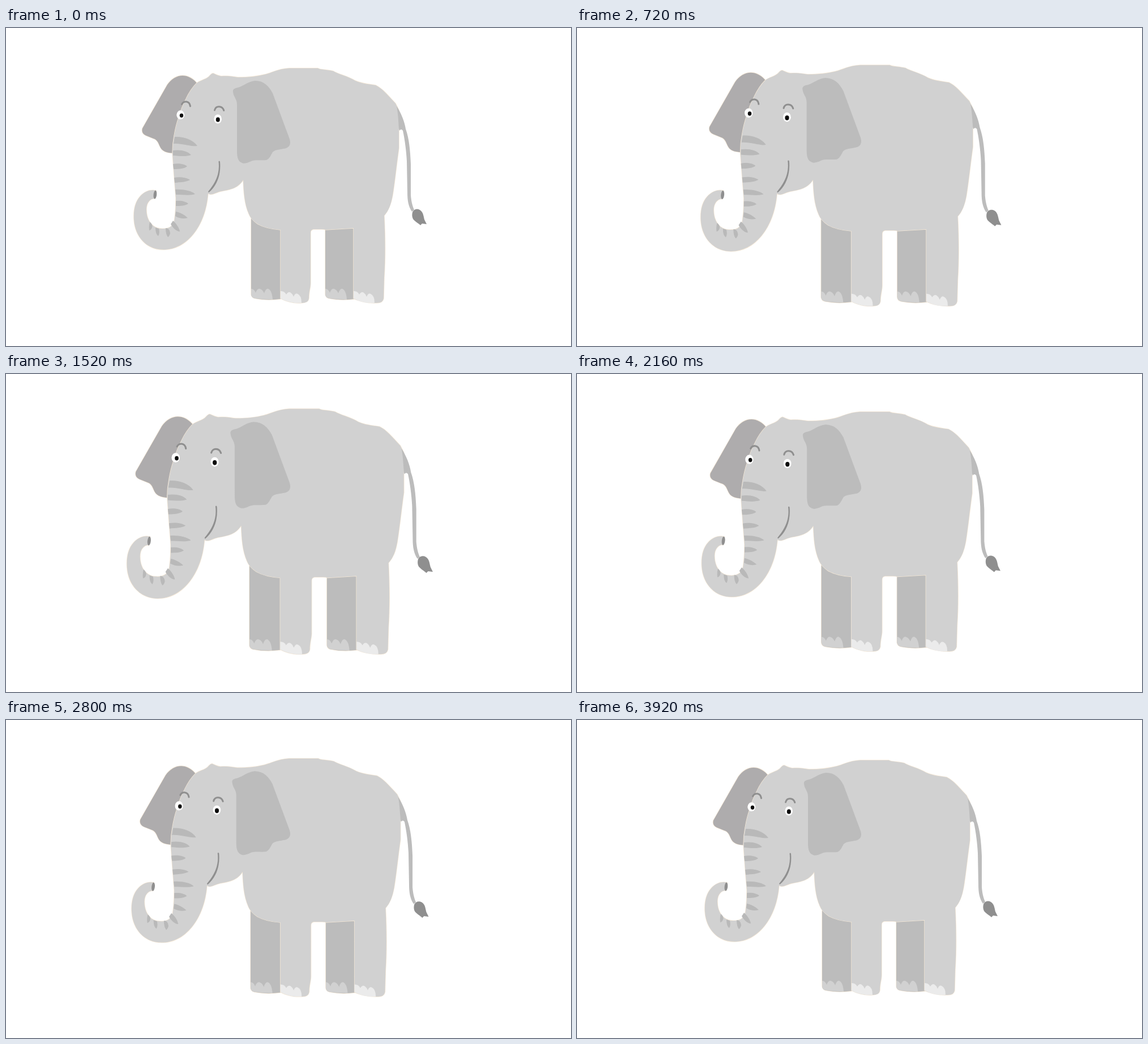
Recreate the animation shown at these times as an HTML page. Size 998x561 px, loop 3960 ms.

```html
<!DOCTYPE html>
<html lang="en">
<head>
<meta charset="utf-8">
<title>Elephant</title>
<style>
  html, body { margin: 0; width: 100%; height: 100%; overflow: hidden; background: #fff; }
  svg { display: block; width: 100vw; height: 100vh; }
  .skin { fill: #d1d1d1; }
  .shade { fill: #bcbcbc; }
  .dark { fill: #8f8f8f; }
  .nail { fill: #ebebeb; }
  .line { fill: none; stroke: #8f8f8f; stroke-width: 3; stroke-linecap: round; }
  .rim { stroke: #f5e8d6; stroke-width: 1.4; paint-order: stroke; }
</style>
</head>
<body>
<svg viewBox="0 0 998 561">
  <defs>
    <path id="farLeg" d="M433 336V470Q434 476 440 477C455 480 470 480 485 478V336Z"/>
    <path id="farToes" d="M433 460Q438 460 441 467Q444 459 448 460Q453 461 456 468Q459 459 463 460Q470 463 471 479Q455 479 440 477Q434 476 433 470Z"/>
    <path id="nearToes" d="M485 464Q492 464 495 470Q499 464 503 467Q506 469 508 474Q511 467 515 469Q522 472 522 485C508 486 495 483 485 477Z"/>
  </defs>
  <g id="elephant">
    <path class="rim" fill="#aeacad" d="M340 101C331 88 320 84 312 84C302 84 292 90 285 100L241 177C239 184 243 188 248 190L263 196C270 200 270 208 275 214C280 219 286 220 296 221L320 170Z"/>

    <g class="shade rim">
      <use href="#farLeg"/>
      <use href="#farLeg" x="131"/>
    </g>
    <g class="skin">
      <use href="#farToes"/>
      <use href="#farToes" x="131"/>
    </g>

    <path class="skin rim" d="M337 97C344 92 352 91 358 86C361 83 363 80 366 80C371 82 374 84 380 85C395 84 400 86 410 87C430 87 445 85 457 82C470 79 480 72 500 71L551 71C556 74 566 73 578 76C588 82 602 84 617 93C628 98 640 99 653 101C665 107 672 116 688 133L694 145L694 212C690 240 687 270 683 295C680 312 676 322 668 331C670 370 670 410 668 440L667 477C666 482 663 485 655 485C640 486 622 482 614 477V353L564 356Q563 355 558 355H543Q538 356 538 361V450C538 458 535 465 535 477C534 483 530 485 522 485C510 486 495 483 485 477V356C470 355 456 352 445 346C438 341 432 336 429 328C421 310 420 290 419 268C410 282 398 285 380 288C368 291 364 296 357 292C352 352 318 391 278 391C248 391 228 368 226 338C225 322 228 307 237 297C244 289 255 284 265 287L263 301C256 300 248 307 248 320C248 338 257 353 274 354C288 355 297 350 298 335C300 320 300 310 300 300L297 262L294 221Q294 205 297 190Q300 172 305 158Q310 140 318 125Q326 108 337 97Z"/>
    <g class="nail">
      <use href="#nearToes"/>
      <use href="#nearToes" x="129"/>
    </g>

    <path class="shade" d="M690 138C698 150 704 165 706 178C712 195 714 215 715 240V295C716 307 718 314 721 321L717 324C711 315 709 305 709 290L708 235C707 215 704 195 701 181Q698 177 695 181L694 178C693 160 692 148 690 138Z"/>
    <path class="dark" d="M718 325C720 320 726 318 731 321C737 325 737 330 739 338L743 346L735 345L732 348C729 345 722 341 719 337C717 333 717 329 718 325Z"/>

    <path class="shade" d="M401 113C400 108 404 106 410 105C420 102 428 94 440 93C455 93 464 102 471 115L501 196C504 206 500 212 490 213C480 215 475 215 471 219C467 226 465 231 460 233C450 234 440 232 433 235C425 239 419 240 415 237C409 234 408 226 408 215V135C408 125 402 122 401 113Z"/>

    <path fill="#b9b9b9" d="M298 192C312 191 330 196 338 208C328 210 312 203 296 204Z
      M295 216C307 214 322 217 327 224C318 227 308 226 295 225Z
      M295 240C304 238 316 240 320 244C316 248 306 249 296 249Z
      M297 264C307 262 320 264 325 268C318 272 308 272 298 273Z
      M299 285C312 284 328 287 334 293C326 296 312 294 300 294Z
      M300 305C309 304 318 306 322 310C316 314 308 314 300 314Z
      M300 324C307 325 316 330 321 335C314 337 306 336 299 332Z
      M295 340C300 344 306 352 307 359C301 359 294 352 291 346Z
      M282 353Q289 353 290 362Q289 367 286 369Q282 364 282 353Z
      M264 352L270 354Q272 362 269 367Q264 364 264 352Z
      M254 342Q260 347 258 352Q257 356 253 357Q252 348 254 342Z"/>
    <ellipse class="dark" cx="263.4" cy="294" rx="2.8" ry="7.5" transform="rotate(6 263.4 294)"/>

    <path class="line" d="M310.5 134.5C314 128 324 128 325.500 138M368.500 145C370.500 136.500 382 136.500 384.800 145.500"/>
    <path class="dark" d="M375.500 235.500Q377 233.500 378 236C380 256 374 277 358.500 290Q356.500 290 357.500 288C371 272 378 256 375.500 235.500Z"/>
    <g fill="#fff">
      <ellipse cx="308.300" cy="153.300" rx="7" ry="8"/>
      <ellipse cx="374.200" cy="160.500" rx="6.800" ry="8"/>
    </g>
    <g fill="#0a0a0a">
      <ellipse cx="310" cy="154.300" rx="3.200" ry="3.600"/>
      <ellipse cx="374.300" cy="161.700" rx="3.500" ry="4.100"/>
    </g>
  </g>
</svg>
<script>
  const LOOP = 3960, STEP = 40, PULSE = 980, GROWTH = 0.05;
  const CX = 499, CY = 280.5;
  const elephant = document.getElementById('elephant');

  // Linear swell and shrink about the stage centre
  function draw(ms) {
    const t = Math.floor((ms % LOOP) / STEP) * STEP;
    const phase = (t % PULSE) / PULSE;
    const swell = 1 - Math.abs(2 * phase - 1);
    const scale = 1 + GROWTH * swell;
    elephant.setAttribute('transform',
      `translate(${CX} ${CY}) scale(${scale}) translate(${-CX} ${-CY})`);
  }

  const start = performance.now();
  function tick() {
    draw(performance.now() - start);
    requestAnimationFrame(tick);
  }
  tick();
</script>
</body>
</html>
```
